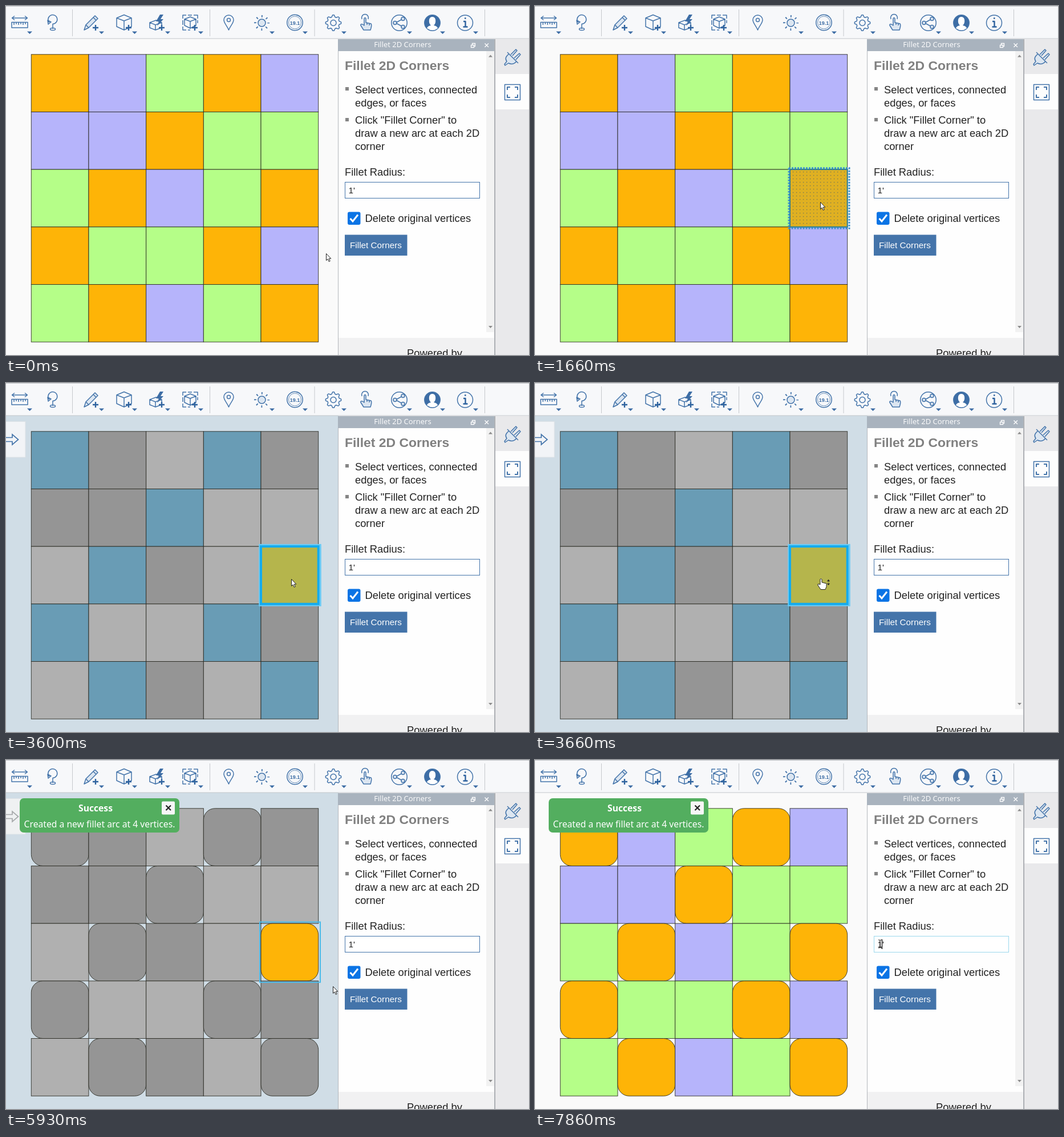
An HTML page that plays this animation: 917x611 px, repeating every 8000 ms.

```html
<!DOCTYPE html>
<html lang="en">
<head>
<meta charset="utf-8">
<title>Fillet 2D Corners</title>
<style>
  html, body { margin: 0; width: 100%; height: 100%; overflow: hidden; background: #fafafa; }
  svg { display: block; width: 917px; height: 611px; }
  text { font-family: "Liberation Sans", Arial, sans-serif; font-size: 18.35px; fill: #222; }
  .small { font-size: 15.3px; }
  .noto { font-family: "Noto Sans", sans-serif; font-size: 15.7px; fill: #fff; }
  .icons { fill: none; stroke: #4474aa; stroke-width: 1.5; stroke-linejoin: round; }
  .solid { fill: #3d6da5; stroke: none; }
  .bold { stroke: #2f639f; stroke-width: 2.4; }
  .pale { fill: #dce6f1; }
</style>
</head>
<body>
<svg viewBox="0 0 917 611">
  <defs>
    <pattern id="dots" width="6" height="6" patternUnits="userSpaceOnUse">
      <rect x="2" y="2" width="1.2" height="1.2" fill="#5f6b60"/>
    </pattern>
  </defs>

  <g id="scene"></g>

  <!-- toolbar -->
  <rect width="917" height="57" fill="#f7f8fa"/>
  <path d="M0 .5H917M0 57H917" stroke="#c3c6ca"/>
  <path d="M116.5 6V53M357.5 6V53M541 6V53M839.5 6V53" stroke="#c6c8cc"/>
  <g class="icons">
    <path d="M11 21H37M15 17.5L10.5 21L15 24.5M33 17.5L37.500 21L33 24.500M10 28.500H38V38H10ZM14 29V33M18 29V32M22 29V33M26 29V32M30 29V33M34 29V32"/>
    <path d="M76 29A8 8 0 1 1 82 31.500V40M73 25L79 28L74 32Z"/><ellipse cx="82" cy="40.500" rx="4.500" ry="2"/>
    <path class="pale" d="M137 42L140 33L156 17L161 22L145 38ZM140 33L145 38M153 20L158 25"/>
    <path d="M194 21L207 15.500L220 21V36L207 42L194 36ZM194 21L207 26L220 21M207 26V42"/>
    <path d="M252 29L263 25L273 29V38L262 42L252 38ZM252 29L262 33V42M262 33L273 29"/>
    <path class="solid" d="M270 15L263 27H268L265 35L276 23H271L276 15Z"/>
    <path d="M310 22V16H316M329 16H336V22M310 36V42H316M319 16H326M310 25V33M336 25V30M319 42H323M313 23L323 19L333 23V34L323 39L313 34ZM313 23L323 27L333 23M323 27V39"/>
    <path class="bold" d="M157 33V43M152 38H162M215 33V43M210 38H220M273 33V43M268 38H278M331 33V43M326 38H336"/>
    <path d="M390.500 42C388 35 382 30 382 24.500A8.500 8.500 0 0 1 399 24.500C399 30 393 35 390.500 42Z"/><circle cx="390.500" cy="24.500" r="3"/>
    <circle class="pale" cx="448.500" cy="29.500" r="6.500"/>
    <circle cx="448.500" cy="29.500" r="11.500" stroke-width="4" stroke-dasharray="1.8 7.232" stroke-dashoffset=".9"/>
    <circle cx="506.500" cy="29" r="13.700"/><circle cx="506.500" cy="29" r="11" stroke-width=".8"/>
    <path id="gear"/><circle cx="574" cy="29.500" r="5"/>
    <path class="pale" d="M627 42L622 34Q621 31 625 32L628 34V22Q629.500 19 631 22V29L640 31Q642 33 639 42Z"/>
    <path d="M624 23A6 6 0 1 1 635 23M633 30V33M637 31V34"/>
    <circle cx="689.500" cy="29.500" r="13.700"/>
    <path d="M695 23L683 29.500L695 36"/>
    <g class="pale"><circle cx="696" cy="22.500" r="3"/><circle cx="682" cy="29.500" r="3"/><circle cx="696" cy="36.500" r="3"/></g>
    <circle cx="747.500" cy="29.500" r="13.700" fill="#3d6da5"/>
    <path d="M738 39Q739 35 745 34Q741 30 742 24Q743 19 747.500 19Q752 19 753 24Q754 30 750 34Q756 35 757 39Q748 46 738 39Z" fill="#fff" stroke="none"/>
    <circle cx="805" cy="29.500" r="13.500"/>
    <path class="bold" d="M802 27H805.500V36M801.500 36.500H809.500M804 21.500H806.500"/>
    <path id="carets" class="solid"/>
  </g>
  <text x="506.500" y="32.500" text-anchor="middle" style="font-size:9px;font-weight:bold;fill:#3d6da5">19.1</text>

  <!-- side tabs -->
  <rect x="857" y="58" width="60" height="553" fill="#e9e9eb"/>
  <rect x="858" y="119" width="59" height="62" fill="#fdfdfd"/>
  <path d="M857.500 58V611" stroke="#a6a8ac"/>
  <g class="icons">
    <path class="pale" d="M882 84L895 97Q889 104 881 100L875 104L874 102L878 97Q873 90 882 84ZM879 81L898 100M885 85L894 76L896 78L888 87M891 91L900 83L902 85L894 94"/>
    <rect x="874.500" y="137.500" width="27" height="27"/>
    <path stroke-width="2" d="M879 147V142H884M892 142H897V147M897 155V160H892M884 160H879V155"/>
  </g>

  <!-- plugin panel -->
  <rect x="582" y="58" width="275" height="553" fill="#fefefe"/>
  <rect x="842" y="79" width="14" height="492" fill="#f2f2f2"/>
  <rect x="583" y="581" width="273" height="30" fill="#f1f1f2"/>
  <path d="M582.500 58V611M856.500 58V611" stroke="#b4b7bc"/>
  <rect x="582" y="58" width="274" height="21" fill="#a9b3be"/>
  <text x="695.500" y="71.500" text-anchor="middle" style="font:13px 'Open Sans',sans-serif;fill:#fff">Fillet 2D Corners</text>
  <path d="M815.500 68.500H820.500V72.500H815.500ZM817.500 68V65.500H822.500V70.500H821M839.500 65.500L846 72M846 65.500L839.500 72" fill="none" stroke="#fff" stroke-width="1.300"/>
  <path d="M846 89.500L849.500 85.500L853 89.500ZM846 560L849.500 564L853 560Z" fill="#8b8b8b"/>
  <text x="594" y="111.500" style="font-size:22.9px;font-weight:bold;fill:#808080">Fillet 2D Corners</text>
  <path d="M595 142H601V148H595ZM595 196H601V202H595Z" fill="#858585"/>
  <text x="612" y="153">Select vertices, connected</text>
  <text x="612" y="176">edges, or faces</text>
  <text x="612" y="206">Click "Fillet Corner" to</text>
  <text x="612" y="229">draw a new arc at each 2D</text>
  <text x="612" y="252">corner</text>
  <text x="594" y="297">Fillet Radius:</text>
  <rect id="field" x="594.500" y="308.500" width="236" height="28" fill="#fff"/>
  <text class="small" x="600.500" y="327.500">1'</text>
  <rect x="599" y="360.500" width="22.500" height="22.500" rx="3" fill="#0b74e5"/>
  <path d="M603.500 372L608 377L617 365.500" fill="none" stroke="#fff" stroke-width="3"/>
  <text x="629.500" y="377.500">Delete original vertices</text>
  <rect x="594" y="400.500" width="109.500" height="36.500" fill="#4474aa"/>
  <rect id="ring" x="595" y="401.500" width="107.500" height="34.500" fill="none" stroke="#bfe0f2" stroke-width="2"/>
  <text class="small" x="648.500" y="423.500" text-anchor="middle" style="fill:#fff">Fillet Corners</text>
  <text x="751.500" y="614" text-anchor="middle">Powered by</text>

  <!-- message -->
  <g id="toast">
    <rect x="24" y="67" width="280" height="60" rx="7" fill="#53ae5f"/>
    <text class="noto" x="157" y="90" text-anchor="middle" font-weight="bold">Success</text>
    <text class="noto" x="164" y="118" text-anchor="middle">Created a new fillet arc at 4 vertices.</text>
    <rect x="273" y="72.500" width="23" height="23" rx="2" fill="#f6f6f6"/>
    <path d="M280.500 79.500L289 88M289 79.500L280.500 88" stroke="#222" stroke-width="2.200"/>
  </g>

  <path id="caret" d="M608.500 314V331" stroke="#111" stroke-width="1.300"/>
  <g id="arrow"><path d="M.5 .5V12.500L3.200 10L5.200 14.500L7.200 13.600L5.200 9.200H8.800Z" fill="#fff" stroke="#222"/></g>
  <g id="hand">
    <path d="M500 343.500Q502 341.500 503 344V349L511 351Q512 357 509 361.500H501L496 354Q495 351 498 352L500 353Z" fill="#fff" stroke="#222"/>
    <path d="M514.500 344L516.500 347H512.500ZM514.500 354L512.500 351H516.500ZM513.500 348.500H515.500" fill="#222" stroke="#222" stroke-width=".5"/>
  </g>
  <g id="beam"><path d="M-3 -7H-1L0 -6L1 -7H3M0 -6V6M-3 7H-1L0 6L1 7H3" fill="none" stroke="#222"/></g>
</svg>
<script>
const LOOP = 8000, FPS = 15;
const LEFT = 44.3, TOP = 84.8, CELL = 100.68;
const ROWS = ['OPGOP', 'PPOGG', 'GOPGO', 'OGGOP', 'GOPGO'];
const COLORS = { O: '#feb407', P: '#b6b4fb', G: '#b5fe88' };
const GREYS = { O: '#959595', P: '#959595', G: '#b0b0b0' };
const HOVER = { O: '#dfb022', P: '#a6acd5', G: '#a6e084' };

// Ticks at 15 per second
const EDIT = 32, SELECT = 54, GRAB = 55, ORIGIN = 56, RELEASE = 60, FILLET = 78, LEAVE = 97, CARET = 118;
const START = [561, 433];
const MOVES = [ // first tick, last tick, x, y
  [18, 25, 500, 343], [59, 64, 617, 438], [65, 68, 623, 436], [70, 72, 623, 434],
  [83, 89, 573, 396], [101, 106, 596, 340], [108, 114, 605, 322]
];

const $ = id => document.getElementById(id);
const show = (id, on) => $(id).setAttribute('display', on ? 'inline' : 'none');
const place = (id, x, y) => $(id).setAttribute('transform', `translate(${x} ${y})`);
const rect = (x, y, w, h, attrs) => `<rect x="${x}" y="${y}" width="${w}" height="${h}" ${attrs}/>`;
const dot = (x, y) => `<circle cx="${x}" cy="${y}" r="2.2" fill="#b9504c" stroke="#8e4a48" stroke-width=".7"/>`;
const inside = ([x, y], l, t, r, b) => x >= l && x <= r && y >= t && y <= b;

function pointer(n) {
  let [x, y] = START;
  for (const [from, to, tx, ty] of MOVES) {
    const p = Math.min(1, Math.max(0, (n - from) / (to - from)));
    const ease = p * p * (3 - 2 * p);
    x += (tx - x) * ease;
    y += (ty - y) * ease;
  }
  return [x, y];
}

function marker(col, row, kind) {
  const x = LEFT + col * CELL, y = TOP + row * CELL;
  const box = attrs => rect(x - 2, y - 2.5, 106, 105.5, `fill="none" ${attrs}`);
  const face = attrs => rect(x, y, CELL, CELL, attrs);
  if (kind === 'hover')
    return face('fill="url(#dots)" stroke="#2b7f95" stroke-width="2"') +
      box('stroke="#3d93cf" stroke-width="3" stroke-dasharray="3 2"');
  if (kind === 'selected')
    return box('stroke="#6bcbf5" stroke-width="3.5"') + face('fill="none" stroke="#14abee" stroke-width="4"');
  return box('stroke="#4bbbea" stroke-width="2"');
}

function drawScene(n, pos) {
  const editing = n >= EDIT && n < LEAVE, selected = n >= SELECT && n < FILLET;
  const col = Math.floor((pos[0] - LEFT) / CELL), row = Math.floor((pos[1] - TOP) / CELL);
  const hovering = n < EDIT && col >= 0 && col < 5;
  let out = rect(0, 57, 583, 554, `fill="${editing ? '#d0dde6' : '#fafafa'}"`);

  ROWS.forEach((line, r) => [...line].forEach((type, c) => {
    const active = r === 2 && c === 4;
    let fill = (editing && !active ? GREYS : COLORS)[type];
    if (selected && type === 'O') fill = active ? '#b5b54c' : '#699cb5';
    if (hovering && r === row && c === col) fill = HOVER[type];
    const radius = n >= FILLET && type === 'O' ? 20 : 0;
    out += rect(LEFT + c * CELL, TOP + r * CELL, CELL, CELL,
      `rx="${radius}" fill="${fill}" stroke="#26261e" stroke-opacity=".85"`);
  }));

  if (hovering) out += marker(col, row, 'hover');
  if (editing) {
    const faded = n >= FILLET;
    out += marker(4, 2, selected ? 'selected' : 'edit') +
      rect(-1, 67.5, 35, 62.5, `fill="${faded ? '#eff1f2' : '#f2f4f7'}" stroke="#dde2e6"`) +
      `<path d="M-2 95.500H11V90L21.500 99L11 108V102.500H-2" fill="none"
        stroke="${faded ? '#a5a8aa' : '#4474aa'}" stroke-width="1.700"/>`;
  }
  if (n >= ORIGIN && n < FILLET) out += dot(LEFT, TOP + 5 * CELL);
  if (n >= RELEASE && n < FILLET) out += dot(497.3, 336.3);
  $('scene').innerHTML = out;
}

function draw(n) {
  const pos = pointer(n);
  const inField = inside(pos, 594, 308, 831, 337);
  const grabbing = n >= GRAB && n < RELEASE;
  drawScene(n, pos);
  show('toast', n >= FILLET);
  show('ring', inside(pos, 594, 400, 704, 437));
  $('field').setAttribute('stroke', inField ? '#9bd8ec' : '#4474aa');
  show('caret', n >= CARET);
  show('hand', grabbing);
  show('beam', inField);
  show('arrow', !grabbing && !inField);
  place('arrow', ...pos);
  place('beam', ...pos);
}

$('gear').setAttribute('d', 'M' + Array.from({ length: 32 }, (_, i) => {
  const r = i % 4 < 2 ? 13.7 : 10.5, a = (i - 0.5) * Math.PI / 16;
  return `${574 + r * Math.cos(a)} ${29.5 + r * Math.sin(a)}`;
}).join('L') + 'Z');
$('carets').setAttribute('d', [41, 167, 225, 283, 341, 466, 524, 592, 707, 765, 823]
  .map(x => `M${x - 4} 44.500H${x + 5}L${x + .5} 49Z`).join(''));

let last = -1;
function tick() {
  const n = Math.floor((performance.now() % LOOP + 7) * FPS / 1000) % (LOOP * FPS / 1000);
  if (n !== last) draw(last = n);
  requestAnimationFrame(tick);
}
tick();
</script>
</body>
</html>
```
